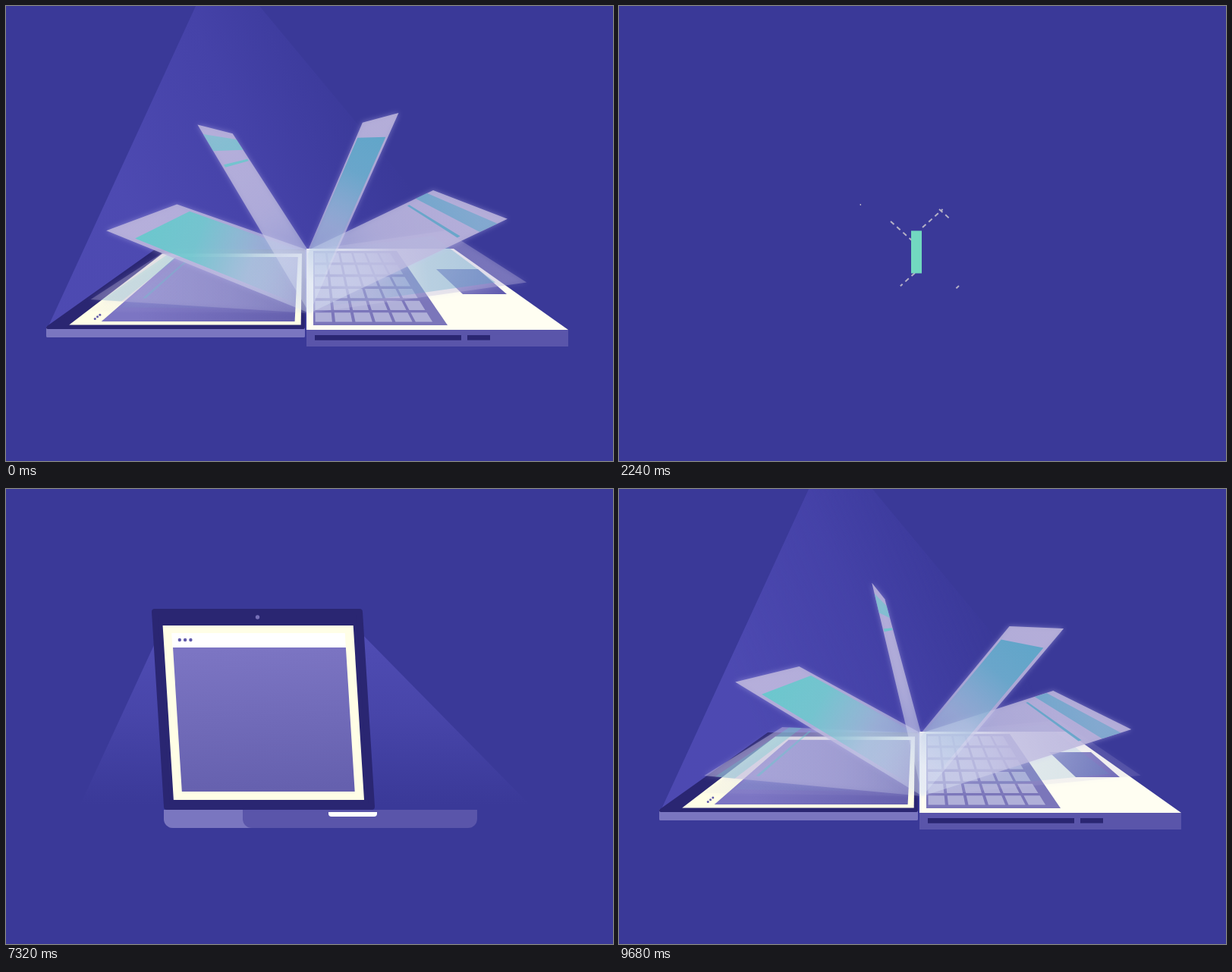
An HTML page with a canvas that plays this animation: 800x600 px, repeating every 9720 ms.

```html
<!DOCTYPE html>
<html lang="en">
<head>
<meta charset="utf-8">
<title>Laptop book</title>
<style>
html, body { margin: 0; width: 100%; height: 100%; overflow: hidden; background: #3a3998; }
canvas { display: block; }
</style>
</head>
<body>
<canvas id="stage" width="800" height="600"></canvas>
<script>
const ctx = document.getElementById('stage').getContext('2d');
const LOOP = 9720;
const BG = '#3a3998', NAVY = '#2a2672', TEAL = '#72d8c0', PALE = '#dedde0', CREAM = '#fffee6', VIOLET = '#5a55aa', LILAC = '#7a76c0';

const clamp = x => Math.max(0, Math.min(1, x));
const span = (t, a, b) => clamp((t - a) / (b - a));
const smooth = p => p * p * (3 - 2 * p);
const backOut = p => 1 + 2.7 * (p - 1) ** 3 + 1.7 * (p - 1) ** 2;
const mix = (a, b, p) => a + (b - a) * p;
const mixAll = (a, b, p) => a.map((v, i) => mix(v, b[i], p));

function path(pts, closed) {
  ctx.beginPath();
  for (let i = 0; i < pts.length; i += 2) ctx.lineTo(pts[i], pts[i + 1]);
  if (closed) ctx.closePath();
}
function poly(pts, fill) {
  path(pts, true);
  ctx.fillStyle = fill;
  ctx.fill();
}
function outline(color, width, pts, closed = true) {
  path(pts, closed);
  ctx.strokeStyle = color;
  ctx.lineWidth = width;
  ctx.stroke();
}
function disc(x, y, r, fill) {
  ctx.beginPath();
  ctx.arc(x, y, r, 0, 7);
  ctx.fillStyle = fill;
  ctx.fill();
}
function box(x, y, w, h, r, fill) {
  ctx.beginPath();
  ctx.roundRect(x, y, w, h, r);
  ctx.fillStyle = fill;
  ctx.fill();
}
function gradient(x0, y0, x1, y1, ...stops) {
  const g = ctx.createLinearGradient(x0, y0, x1, y1);
  stops.forEach((c, i) => g.addColorStop(i / (stops.length - 1), c));
  return g;
}
function layer(alpha, draw) {
  if (alpha <= 0) return;
  ctx.save();
  ctx.globalAlpha *= alpha;
  draw();
  ctx.restore();
}
// Point inside a quad whose corners run: top left, top right, bottom right, bottom left
const inside = (q, u, v) => [0, 1].map(i => mix(mix(q[i], q[i + 2], u), mix(q[i + 6], q[i + 4], u), v));
const part = (q, u0, v0, u1, v1) => [...inside(q, u0, v0), ...inside(q, u1, v0), ...inside(q, u1, v1), ...inside(q, u0, v1)];

// ---- laptop -------------------------------------------------------------
// lid corners, tip of the light beam, base: x, x scale, y scale, front y, front height, page lean
const FRONT = { lid: [196, 162, 466, 162, 482, 419, 212, 419], apex: [207, 162], base: [208, 1.197, 0, 423, 24, 0] };
const TURN = { lid: [26, 291, 178, 298, 339, 362, 310, 405], apex: [135, 150], base: [328, 1, .75, 427, 16, -14] };
const FLAT = { lid: [55, 424, 197, 323, 392, 323, 392, 424], apex: [280, -65], base: [396, 1, 1, 427, 22, 0] };
const mixPose = (a, b, p) => Object.fromEntries(Object.keys(a).map(k => [k, mixAll(a[k], b[k], p)]));

function page(angle, filled, place, lean) {
  const back = angle + .025 * (1 - Math.cos(angle));
  const tips = [...place(400 + 289 * Math.cos(angle), 405 - 289 * Math.sin(angle)),
    ...place(398 + lean + 183 * Math.cos(back), 322 - 183 * Math.sin(back))];
  const q = [...tips, ...place(398, 322), ...place(400, 405)];
  const shade = (...stops) => gradient(...inside(q, .5, 0), ...inside(q, .5, 1), ...stops);
  layer(Math.min(clamp(5 * (angle - .06)), clamp(6 * (Math.PI - angle))), () => {
    ctx.shadowColor = 'rgba(200,195,245,.5)';
    ctx.shadowBlur = 7;
    poly(q, shade('rgba(188,181,220,.88)', 'rgba(194,190,224,.74)', 'rgba(226,239,246,.3)'));
    ctx.shadowBlur = 0;
    const tint = a => `rgba(${angle > Math.PI / 2 ? '96,203,203' : '82,164,198'},${a})`;
    if (filled) {
      poly(part(q, .07, .12, .95, 1), shade(tint(.88), tint(.75), tint(.2), tint(0)));
    } else {
      poly(part(q, 0, .05, 1, .14), shade(tint(.5), tint(1)));
      poly(part(q, .08, .215, .95, .23), tint(.75));
    }
  });
}

function keyboard(place) {
  const flat = pts => [0, 2, 4, 6].flatMap(i => place(pts[i], pts[i + 1]));
  poly(flat([396, 320, 590, 320, 741, 427, 396, 427]), '#fffef2');
  const keys = flat([405, 323, 515, 323, 582, 421, 405, 421]);
  poly(keys, '#7b76ba');
  for (let row = 0; row < 6; row++) for (let col = 0; col < 6; col++) {
    const u = .015 + col * .152, v = .03 + row * .16;
    poly(part(keys, u, v, u + .128, v + .125), '#b0b0d8');
  }
  poly(flat([567, 347, 622, 347, 660, 380, 602, 380]), gradient(...place(570, 350), ...place(650, 380), '#8f8bc6', '#625db0'));
}

function lidPanel({ lid }, k, lit, shown) {
  const slab = (q, color) => {
    poly(q, color);
    outline(color, mix(8, 4, k), q);
  };
  ctx.lineJoin = 'round';
  layer(k, () => {
    const low = lid.map((v, i) => v + (i % 2) * 11);
    slab(low, LILAC);
    slab([...lid.slice(0, 2), ...lid.slice(6), ...low.slice(6), ...low.slice(0, 2)], LILAC);
  });
  slab(lid, NAVY);
  layer(1 - k, () => disc(331.5, 169, 2.7, '#7770b8'));
  layer(lit, () => poly(part(lid, .035, .07, .965, mix(.965, .99, k)), CREAM));
  layer(shown, () => {
    layer(1 - k, () => poly(part(lid, .076, .109, .922, .183), '#fff'));
    const view = part(lid, .078, .183, .922, mix(.922, .965, k));
    poly(view, gradient(...inside(view, .5, 0), ...inside(view, .5, 1), '#7c75c3', '#6560ae'));
    for (let i = 0; i < 3; i++) disc(...inside(lid, .113 + i * .027, .144), mix(2.2, 1.5, k), '#615bab');
  });
}

function basePanel([x, sx, sy, y, h], k, place) {
  if (sy > 0) keyboard(place);
  const r = 12 * (1 - k);
  box(x, y, 345 * sx, h, [0, 0, r, r], VIOLET);
  layer(1 - k, () => {
    box(x, y, 118, h, [0, 0, 0, r], LILAC);
    box(x + 104, y, 40, h, [0, 0, 0, r], VIOLET);
    box(425, 426, 64, 6, [0, 0, 4, 4], '#fff');
  });
  layer(k, () => {
    for (const [left, width] of [[11, 193], [212, 30]]) box(x + left * sx, y + h * .32, width * sx, h * .3, 0, NAVY);
  });
}

function laptop(t) {
  const early = t < 2000, clock = early ? t : t - LOOP;
  const first = span(clock, -1620, -760), second = 1 - (1 - span(clock, -760, 0)) ** 3;
  const pose = second > 0 ? mixPose(TURN, FLAT, second) : mixPose(FRONT, TURN, first ** 2);
  const { lid, apex, base } = pose;
  const k = clamp(first * 2.2);
  const place = (x, y) => [base[0] + (x - 396) * base[1], base[3] + (y - 427) * base[2]];

  const fall = early ? span(t, 750, 1250) : 0;
  const open = early ? 1 : backOut(span(t, 6350, 6850));
  const lit = early ? 1 : span(t, 6700, 7000);
  const shown = early ? 1 : smooth(span(t, 7000, 7200));
  const tilted = (side, draw) => layer(1, () => {
    ctx.translate(396, 427 + 500 * fall ** 3);
    ctx.rotate(side * .7 * fall ** 2);
    ctx.translate(-396, -427);
    draw();
  });

  layer(lit * (1 - k), () => poly([207, 180, 458, 180, 690, 416, 98, 416],
    gradient(0, 180, 0, 416, 'rgba(88,84,190,.75)', 'rgba(88,84,190,.45)', 'rgba(88,84,190,0)')));
  layer(k * (1 - fall), () => {
    const foot = place(600, 320), edge = [mix(lid[0], apex[0], .4), mix(lid[1], apex[1], .4)];
    if (second < 1) ctx.filter = `blur(${9 * (1 - second)}px)`;
    poly([lid[0], lid[1], ...apex, ...foot], gradient(...edge, mix(apex[0], foot[0], .6), mix(apex[1], foot[1], .4),
      'rgba(90,85,194,.6)', 'rgba(86,80,192,.4)', 'rgba(80,74,190,0)'));
  });
  tilted(-1, () => {
    ctx.translate(0, 423 * (1 - open));
    ctx.scale(1, open);
    lidPanel(pose, k, lit, shown);
  });
  tilted(1, () => basePanel(base, k, place));

  // Pages turn one after another, faster once the book lies flat; filled and lined ones alternate
  layer(k * (1 - fall), () => {
    ctx.translate(0, 500 * fall ** 3);
    const pages = [];
    for (let n = -3; n < 10; n++) {
      const upright = -191 + n * (n < 0 ? 187 : 122);
      pages.push({ angle: Math.PI / (1 + Math.exp((upright - clock) * .0103)), filled: n % 2 === 0 });
    }
    const fromUpright = p => Math.abs(p.angle - Math.PI / 2);
    pages.sort((a, b) => fromUpright(b) - fromUpright(a)).forEach(p => page(p.angle, p.filled, place, base[5]));
  });
}

// ---- network ------------------------------------------------------------
// Stops of each wire; between two stops it runs aslant, then straight
const WIRES = [
  [387, 310, 350, 200], [390, 352, 361, 396, 361, 436], [361, 396, 330, 396, 330, 337],
  [412, 212, 394, 231, 341, 179], [518, 363, 413, 405, 378, 372], [448, 369, 413, 405],
  [400, 292, 432, 259], [422, 268, 498, 306], [437, 405, 437, 460], [437, 467, 455, 445, 512, 479],
  [319, 262, 302, 263, 262, 314], [265, 180, 319, 252], [212, 29, 203, 66, 265, 180, 205, 186],
  [125, 183, 144, 200, 205, 186], [235, 245, 188, 315, 259, 351], [208, 335, 124, 387], [351, 516, 308, 516, 310, 562]
];
// The network spreads outwards from the bar
const reached = (x, y) => 1950 + 1.05 * Math.hypot(x - 392, y - 310) ** 1.25;

function bend(stops) {
  const pts = stops.slice(0, 2);
  for (let i = 2; i < stops.length; i += 2) {
    const [x0, y0, x1, y1] = stops.slice(i - 2, i + 2), dx = x1 - x0, dy = y1 - y0;
    const run = Math.min(Math.abs(dx), Math.abs(dy) / .9);
    if (run > 8) pts.push(x0 + Math.sign(dx) * run, y0 + Math.sign(dy) * run * .9);
    pts.push(x1, y1);
  }
  return pts;
}
function reveal(pts, length) {
  ctx.beginPath();
  ctx.moveTo(pts[0], pts[1]);
  for (let i = 2; i < pts.length && length > 0; i += 2) {
    const [x0, y0, x1, y1] = pts.slice(i - 2, i + 2);
    const size = Math.hypot(x1 - x0, y1 - y0), p = Math.min(1, length / size);
    ctx.lineTo(mix(x0, x1, p), mix(y0, y1, p));
    length -= size;
  }
  ctx.stroke();
}

const dot = (r, color) => () => disc(0, 0, r, color);
const square = (half, turn) => () => {
  ctx.rotate(turn);
  outline(NAVY, 1.3, [-half, -half, half, -half, half, half, -half, half]);
};
const ring = () => {
  ctx.beginPath();
  ctx.arc(0, 0, 6, 0, 7);
  ctx.strokeStyle = NAVY;
  ctx.lineWidth = 2;
  ctx.stroke();
};
const triangle = () => outline(PALE, 2.2, [0, -16, 20, 14.5, -19, 14.5]);
const check = () => outline(TEAL, 2.2, [-13, -5, -3, 7, 14, -8], false);
const SHAPES = [
  [319, 262, dot(6, PALE)], [259, 317, ring], [244, 239, dot(11, TEAL)], [446, 245, square(13.5, 0)], [452, 352, triangle],
  [172, 224, dot(6.7, NAVY)], [203, 523, dot(11, PALE)], [292, 91, check], [87, 390, square(15.5, -.2)]
];

function network(t) {
  const left = 1 - span(t, 4350, 4800);
  ctx.strokeStyle = '#b5b1c6';
  ctx.lineWidth = 2;
  ctx.setLineDash([6, 5]);
  for (const stops of WIRES) {
    const length = (t - reached(stops[0], stops[1])) * .145;
    if (length > 0) reveal(bend(stops), Math.min(length, 360) * left);
  }
  ctx.setLineDash([]);
  ctx.strokeStyle = TEAL;
  ctx.lineWidth = 2.3;
  if (t > 3700) reveal([373, 437, 345.5, 437, 345.5, 479.5, 388, 479.5], (t - 3700) * .2 * left);

  SHAPES.forEach(([x, y, draw], i) => {
    const start = reached(x, y) + 200, size = backOut(span(t, start, start + 250));
    const drop = span(t, 4320 + i * 20, 4850);
    if (size > 0 && drop < 1) layer(1, () => {
      ctx.translate(x, y + 600 * drop ** 2);
      ctx.rotate(drop);
      ctx.scale(size, size);
      draw();
    });
  });
}

function bar(t) {
  if (t < 4500) {
    const h = 120 * (1 - (1 - span(t, 1960, 2680)) ** 1.28);
    box(385, 352.5 - h, 14, h, 0, TEAL);
    return;
  }
  const turn = smooth(span(t, 4500, 5000)), grow = smooth(span(t, 5050, 5700)), land = smooth(span(t, 6000, 6350));
  const [x, y, w, h] = mixAll(mixAll([392, 292, 120, 14], [395.5, 331, 191, 14], grow), [414.5, 435, 413, 24], land);
  layer(1, () => {
    ctx.translate(x, y);
    ctx.rotate((turn - 1) * Math.PI / 2);
    const r = [0, 0, 12 * land, 12 * land];
    box(-w / 2, -h / 2, w, h, r, TEAL);
    layer(land, () => box(-w / 2, -h / 2, w, h, r, VIOLET));
  });
}

function frame(now) {
  const t = now % LOOP;
  ctx.fillStyle = BG;
  ctx.fillRect(0, 0, 800, 600);
  if (t < 1250 || t >= 6350) laptop(t);
  else if (t >= 1960) {
    if (t < 5000) network(t);
    bar(t);
  }
}

let begin;
function tick(now) {
  begin ??= now;
  frame(now - begin);
  requestAnimationFrame(tick);
}
frame(0);
requestAnimationFrame(tick);
</script>
</body>
</html>
```
